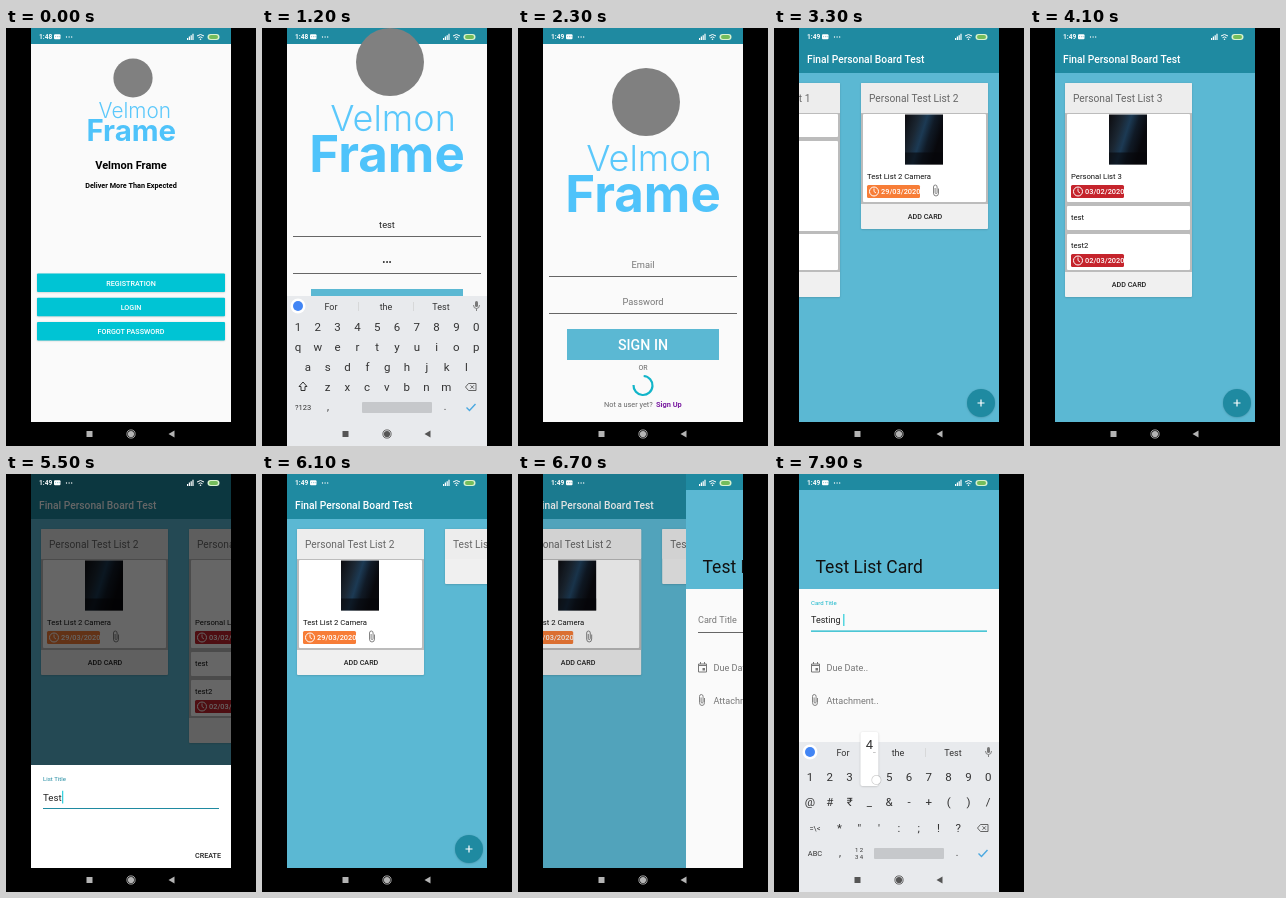
Animation, 250 px wide and 418 px high, one loop 8000 ms. Source, as an HTML page with a canvas:

```html
<!DOCTYPE html>
<html lang="en">
<head>
<meta charset="utf-8">
<title>Task board app</title>
<style>
  html, body { margin: 0; width: 100%; height: 100%; overflow: hidden; background: #000; }
  canvas { display: block; width: 100vw; height: 100vh; }
</style>
</head>
<body>
<canvas id="stage"></canvas>
<script>
const W = 250, H = 418, LOOP = 8000, STEP = 100;
const TEAL = '#1f8aa1', SKY = '#5bb8d3', CYAN = '#00c4d4', PAPER = '#fafafa', KEYS = '#e8eaed';
const canvas = document.getElementById('stage');
const c = canvas.getContext('2d');

// Linear interpolation through [time, value] pairs.
function key(t, ...points) {
  if (t <= points[0][0]) return points[0][1];
  for (let i = 1; i < points.length; i++) {
    const [t0, v0] = points[i - 1], [t1, v1] = points[i];
    if (t <= t1) return v0 + (v1 - v0) * (t - t0) / (t1 - t0);
  }
  return points.at(-1)[1];
}

function rect(x, y, w, h, color, r = 0) {
  c.fillStyle = color;
  c.beginPath();
  c.roundRect(x, y, w, h, r);
  c.fill();
}

function disc(x, y, r, color) {
  c.fillStyle = color;
  c.beginPath();
  c.arc(x, y, r, 0, 7);
  c.fill();
}

function arc(x, y, r, color, width, from = 0, to = 2 * Math.PI) {
  c.strokeStyle = color;
  c.lineWidth = width;
  c.beginPath();
  c.arc(x, y, r, from, to);
  c.stroke();
}

function stroke(path, color, width = 1) {
  c.strokeStyle = color;
  c.lineWidth = width;
  c.stroke(new Path2D(path));
}

function text(s, x, y, size, color, weight = 400, align = 'left', family = 'Roboto') {
  c.font = `${weight} ${size}px ${family}, sans-serif`;
  c.fillStyle = color;
  c.textAlign = align;
  c.fillText(s, x, y);
  return c.measureText(s).width;
}

const center = (s, x, y, size, color, weight) => text(s, x, y, size, color, weight, 'center');

function shifted(dx, dy, paint) {
  c.save();
  c.translate(dx, dy);
  paint();
  c.restore();
}

function shadowed(paint) {
  c.save();
  c.shadowColor = 'rgba(0,0,0,.2)';
  c.shadowBlur = 2;
  c.shadowOffsetY = .5;
  paint();
  c.restore();
}

const typed = (s, t, start) => s.slice(0, Math.max(0, Math.floor((t - start) / STEP) + 1));

function screen(color) {
  rect(25, 0, 200, 16, TEAL);
  rect(25, 16, 200, 378, color);
}

// A new screen slides in from the right; the old one trails and dims.
function push(x, under, over) {
  const p = 1 - x / 200;
  if (p < 1) {
    shifted(-52 * p, 0, under);
    rect(25, 0, 200, 394, `rgba(0,0,0,${.4 * p})`);
  }
  if (p > 0) shifted(x, 0, over);
}

function statusBar(t) {
  text(t < 1500 ? '1:48' : '1:49', 33, 11.3, 6.6, '#fff', 700);
  rect(48, 6.3, 6.5, 5, '#fff', 1);
  for (let i = 0; i < 3; i++) {
    disc(49.5 + i * 1.8, 8.7, .45, TEAL);
    disc(60.5 + i * 2.6, 9, .65, '#fff');
  }
  for (let i = 0; i < 4; i++) rect(181 + i * 1.8, 10 - i * 1.4, 1.2, 2 + i * 1.4, '#fff');
  stroke('M191 8q3.5-3 7 0M192.5 9.7q2-1.6 4 0', '#fff', 1);
  disc(194.5, 11.2, .8, '#fff');
  rect(201.5, 6, 12, 6, '#d9f2cf', 3);
  rect(203, 7, 9, 4, '#74bd5c', 2);
}

function navBar(light) {
  rect(25, 394, 200, 24, light ? KEYS : '#000');
  const ink = light ? '#555' : '#b4b4b4';
  rect(80.5, 403, 6, 6, ink);
  arc(125, 406, 4.1, ink, .9);
  disc(125, 406, 3.1, ink);
  c.fillStyle = ink;
  c.fill(new Path2D('M168.5 402.5v7l-6-3.5z'));
}

function logo(x, y, scale) {
  c.save();
  c.translate(x, y);
  c.scale(scale, scale);
  disc(0, 0, 34, '#808080');
  text('Velmon', 3, 69, 36, '#5bc8fb', 300, 'center', 'Inter');
  text('Frame', -3, 110, 51, '#4fc3fa', 700, 'center', 'Inter');
  c.restore();
}

function home(t) {
  screen(PAPER);
  logo(127, 50, .577);
  center('Velmon Frame', 125, 141, 11, '#000', 700);
  center('Deliver More Than Expected', 125, 160, 7.25, '#000', 700);
  ['REGISTRATION', 'LOGIN', 'FORGOT PASSWORD'].forEach((label, i) => {
    const y = 245.5 + i * 24.3;
    shadowed(() => rect(31, y, 188, 18.5, CYAN, 1));
    if (i === 1 && t >= 100 && t < 600) rect(31, y, 188, 18.5, 'rgba(0,0,0,.1)', 1);
    center(label, 125, y + 12, 7.2, '#fff', 500);
  });
}

function login(t) {
  screen(PAPER);
  const email = t < 1700 ? typed('test', t, 700) : '';
  const dots = t < 1700 ? '•'.repeat(typed('1234', t, 1000).length) : '';
  shifted(0, -40 * keyboardRise(t), () => {
    logo(128, 74, 1);
    center(email || 'Email', 125, 240, 9.3, email ? '#222' : '#777');
    rect(31, 248, 188, 1, '#666');
    center(dots || 'Password', 125, 276.5, 9.3, dots ? '#222' : '#777');
    rect(31, 285, 188, 1, '#666');
    rect(49, 301, 152, 31, SKY);
    if (t >= 1600 && t < 1800) rect(49, 301, 152, 31, 'rgba(0,0,0,.1)');
    center('SIGN IN', 125, 322, 14.2, '#fff', 500);
    center('OR', 125, 342, 7, '#666');
    if (t >= 1700) {
      const turn = (t - 2300) / 160;
      arc(125, 357.5, 9.5, '#12b5c9', 2.2, turn - 1.5, turn + 3.2);
    }
    text('Not a user yet?', 86, 379, 7.35, '#666');
    text('Sign Up', 138, 379, 7.4, '#7b1fa2', 700);
  });
}

function paperclip(x, y, color) {
  stroke(`M${x + 2.5} ${y - 2}v4.5q0 3-2.5 3t-2.5-3v-6q0-2 1.8-2t1.8 2v5.5q0 1-1 1t-1-1v-4.5`, color, .9);
}

function badge(x, y, date, color) {
  rect(x, y, 53, 13, color, 1.5);
  arc(x + 7, y + 6.5, 4.5, '#fff', 1);
  stroke(`M${x + 7} ${y + 3.5}v3l2 1.5`, '#fff', .9);
  text(date, x + 14, y + 8.5, 7.4, '#fff', 500);
}

function photo(x, y) {
  const g = c.createLinearGradient(x, y, x + 38, y + 12);
  g.addColorStop(0, '#0c0b0e');
  g.addColorStop(.35, '#1b2733');
  g.addColorStop(.55, '#1c3a54');
  g.addColorStop(.75, '#101a26');
  g.addColorStop(1, '#08080c');
  rect(x, y, 38, 50, g);
  rect(x, y + 38, 38, 12, 'rgba(6,6,9,.6)');
}

const ORANGE = '#f77d37', RED = '#c5242c';
const LISTS = {
  one: { title: 'Personal Test List 1', end: 244, cards: [
    { y: 86, h: 23, name: 'Test 1' }, { y: 113, h: 90, name: 'Test List 1' }, { y: 206, h: 36, name: 'Test 2' }] },
  two: { title: 'Personal Test List 2', end: 176, cards: [
    { y: 86, h: 88, name: 'Test List 2 Camera', photo: true, date: '29/03/2020', color: ORANGE, clip: true }] },
  three: { title: 'Personal Test List 3', end: 244, cards: [
    { y: 86, h: 88, name: 'Personal List 3', photo: true, date: '03/02/2020', color: RED },
    { y: 178, h: 24, name: 'test' },
    { y: 206, h: 36, name: 'test2', date: '02/03/2020', color: RED }] },
  fresh: { title: 'Test List', end: 85, cards: [] }
};

function column(x, list) {
  const { title, end, cards } = list;
  shadowed(() => rect(x, 55, 127, end - 30, '#f0f0f0', 1));
  rect(x, 55, 127, 30, '#ededed', 1);
  text(title, x + 8, 74, 10.2, '#666');
  rect(x, 85, 127, end - 85, '#bcbcbc');
  for (const card of cards) {
    rect(x + 2, card.y, 123, card.h, '#fff', 1);
    if (card.photo) photo(x + 44, 86.5);
    text(card.name, x + 6, card.y + (card.photo ? 64.5 : 13.5), 7.7, '#111');
    if (card.date) badge(x + 6, card.y + (card.photo ? 71 : 20), card.date, card.color);
    if (card.clip) paperclip(x + 75, 162.5, '#777');
  }
  center('ADD CARD', x + 64, end + 15, 7.2, '#222', 500);
}

function board(t) {
  screen(SKY);
  const scroll = key(t, [3000, 0], [3300, 96], [3500, 148], [3800, 148], [4100, 296],
    [4300, 296], [4600, 148], [6500, 148], [6700, 172]);
  const { one, two, three, fresh } = LISTS;
  const lists = t < 5900 ? [one, two, three] : [one, two, fresh, three];
  lists.forEach((list, i) => column(35 + i * 148 - scroll, list));
  rect(25, 16, 200, 29, TEAL);
  text('Final Personal Board Test', 33, 35, 10.25, '#fff', 500);
  shadowed(() => disc(207, 375, 14, t >= 4800 && t < 5000 ? '#3a9db2' : TEAL));
  stroke('M203.5 375h7M207 371.5v7', '#fff', 1.2);
}

function cursorAfter(s, x, y, size) {
  const width = text(s, x, y, size, '#222');
  rect(x + width + .6, y - size, 1, size + 3, CYAN);
}

function listSheet(t) {
  const shown = key(t, [4800, 0], [5000, 1], [5600, 1], [5800, 0]);
  if (!shown) return;
  rect(25, 0, 200, 394, `rgba(0,0,0,${.6 * shown})`);
  shifted(0, 103 * (1 - shown) - 126 * keyboardRise(t), () => {
    rect(25, 291, 200, 104, '#fff');
    text('List Title', 37, 307, 6, TEAL);
    cursorAfter(typed('Test', t, 5100), 37, 326.5, 9.7);
    rect(37, 334, 176, 1, TEAL);
    text('CREATE', 215, 384, 7.2, '#222', 500, 'right');
  });
}

function cardScreen(t) {
  screen(PAPER);
  rect(25, 16, 200, 99, SKY);
  text('Test List Card', 41.5, 98.5, 17.5, '#111');
  if (t < 6900) {
    text('Card Title', 37, 149, 9.1, '#777');
    rect(37, 158, 176, 1, '#666');
  } else {
    text('Card Title', 37, 131, 6, '#12b5c9');
    cursorAfter(typed('Testing ', t, 7000), 37, 149, 9);
    rect(37, 156.5, 176, 1.3, '#12b5c9');
  }
  stroke('M37.5 190h8v8h-8zM37.5 191.5h8M39.5 188v2M43.5 188v2', '#777', 1);
  rect(41.5, 194, 2.5, 2.5, '#777');
  text('Due Date..', 52.5, 197, 9.1, '#777');
  paperclip(41, 226, '#777');
  text('Attachment..', 52.5, 230, 9.1, '#777');
}

const LETTERS = ['1234567890', 'qwertyuiop', 'asdfghjkl', 'zxcvbnm'];
const SYMBOLS = ['1234567890', '@#₹_&-+()/', '', '*"\':;!?'];
const keyboardRise = t => Math.max(
  key(t, [600, 0], [700, 1], [1200, 1], [1300, 0]),
  key(t, [4900, 0], [5000, 1], [5400, 1], [5500, 0]),
  key(t, [6800, 0], [7000, 1]));

// The key being held at this time.
function pressedKey(t) {
  if (t >= 7900) return '4';
  for (const [word, start] of [['test', 700], ['test', 5100], ['testing', 7000]]) {
    const i = Math.floor((t - start) / STEP);
    if (i >= 0 && i < word.length) return word[i];
  }
}

function keyboard(t) {
  const rise = keyboardRise(t);
  if (!rise) return;
  const symbols = t >= 7700, ink = '#333', pressed = pressedKey(t);
  shifted(0, 126 * (1 - rise), () => {
    rect(25, 268, 200, 127, KEYS);
    disc(36, 278, 7.5, '#fff');
    disc(36, 278, 5, '#4285f4');
    [['For', 69], ['the', 124], ['Test', 179]].forEach(([s, x]) => center(s, x, 281.5, 9, ink));
    rect(96, 274, .6, 9, '#ccc');
    rect(151, 274, .6, 9, '#ccc');
    rect(213, 273, 3, 6, '#777', 1.5);
    stroke('M211.5 277q0 3.5 3 3.5t3-3.5M214.5 280.5v2.5', '#777', .9);

    let held;
    (symbols ? SYMBOLS : LETTERS).forEach((row, r) => {
      const y = symbols ? [303, 328, 0, 354][r] : [299, 319, 339, 359][r];
      const left = [36, 36, 46, 65.5][r];
      [...row].forEach((ch, i) => {
        const x = left + i * 19.8;
        center(ch, x, y + 4, 11.5, ink);
        if (ch === pressed) held = { ch, x, y };
      });
    });
    const y = symbols ? 354 : 359;
    if (symbols) center('=\\<', 41, y + 3, 7.5, ink);
    else stroke('M41 354l-4 4.5h2v4h4v-4h2z', ink, 1);
    stroke(`M203.5 ${y}l3-3.5h7.5v7h-7.5zM208.5 ${y - 1.7}l3.4 3.4m0-3.4l-3.4 3.4`, '#555', .9);
    center(symbols ? 'ABC' : '?123', 41, 382, 7.5, ink);
    center(',', 66, 382, 10, ink);
    if (symbols) {
      center('1 2', 85, 378, 6, ink);
      center('3 4', 85, 384.5, 6, ink);
    }
    rect(100, 374, 70, 11, '#c6c8cb', 1);
    center('.', 183, 382, 10, ink);
    stroke('M204.5 379.5l3 3 6-6.5', '#4aa8e0', 1.4);

    if (held) {
      shadowed(() => rect(held.x - 9, held.y - 45, 18, 54, '#fff', 2));
      center(held.ch, held.x, held.y - 28, 13, ink);
      if (held.ch === '4') center('_', held.x + 5, held.y - 25, 6, '#777');
      disc(held.x + 7, held.y + 3, 5, 'rgba(120,120,120,.35)');
      disc(held.x + 7, held.y + 3, 4.3, '#fff');
    }
  });
}

function draw(t) {
  rect(0, 0, W, H, '#000');
  c.save();
  c.beginPath();
  c.rect(25, 0, 200, H);
  c.clip();
  if (t < 2400) {
    push(key(t, [300, 200], [400, 130], [500, 35], [600, 0]), () => home(t), () => login(t));
  } else if (t < 6600) {
    push(key(t, [2400, 200], [2500, 143], [2600, 35], [2700, 0]), () => login(t), () => board(t));
    listSheet(t);
  } else {
    push(key(t, [6600, 200], [6700, 143], [6800, 35], [6900, 0]), () => board(t), () => cardScreen(t));
  }
  statusBar(t);
  keyboard(t);
  navBar(keyboardRise(t) > .4);
  c.restore();
}

const ratio = window.devicePixelRatio || 1;
canvas.width = W * ratio;
canvas.height = H * ratio;
c.scale(ratio, ratio);

const began = performance.now();
function tick() {
  const t = (performance.now() - began) % LOOP;
  draw(Math.floor(t / STEP) * STEP);
  requestAnimationFrame(tick);
}
tick();
</script>
</body>
</html>
```
